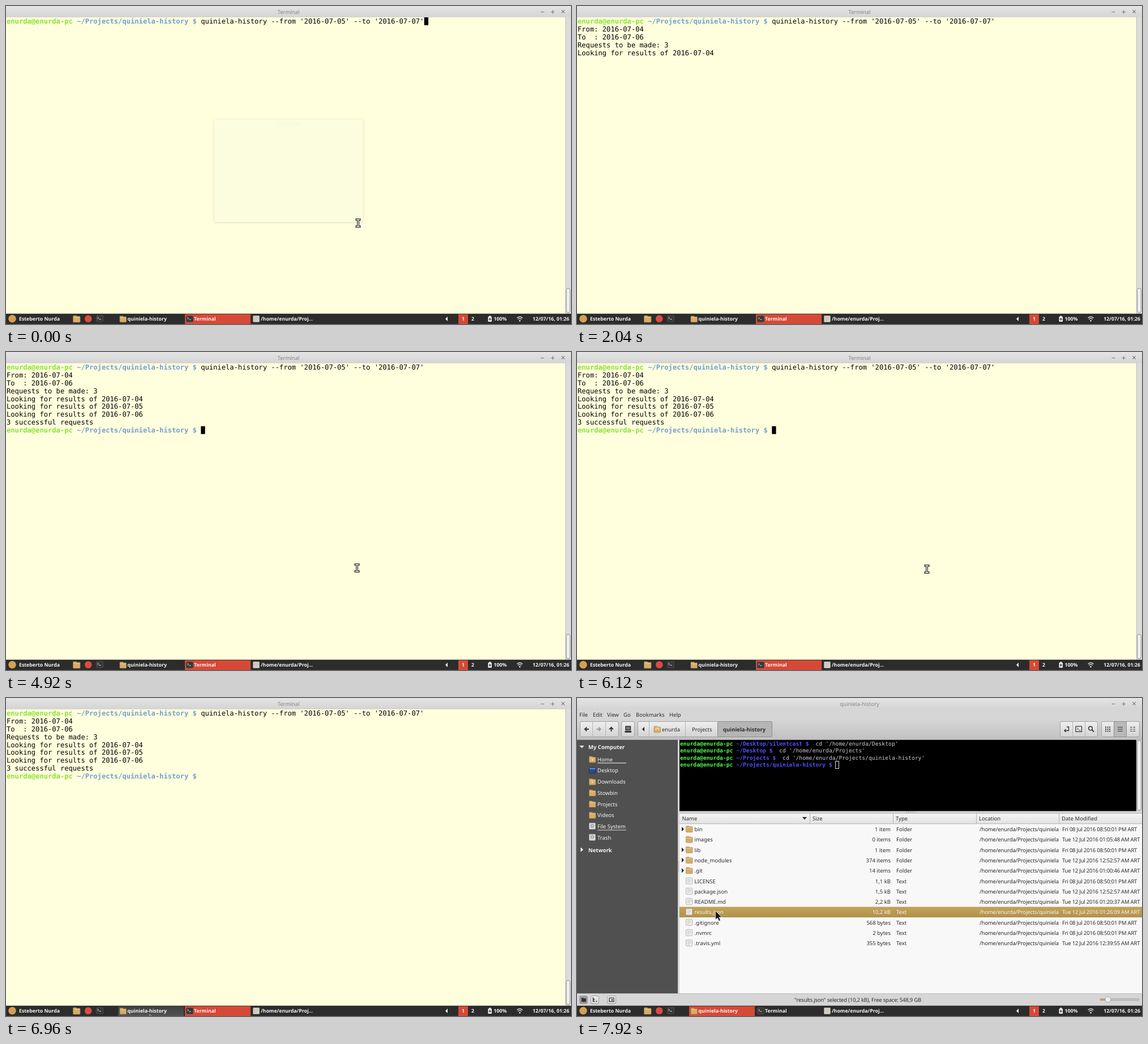
Animation, 998 px wide and 561 px high, one loop 8000 ms. Source, as an HTML page:

```html
<!DOCTYPE html>
<html lang="en">
<head>
<meta charset="utf-8">
<title>Terminal session</title>
<style>
html, body { margin: 0; width: 100%; height: 100%; overflow: hidden; }
svg { display: block; width: 998px; height: 561px; }
text { white-space: pre; text-rendering: geometricPrecision; font: 9.5px "Noto Sans", "Open Sans", sans-serif; fill: #2d2d2d; }
.title { fill: #858585; text-anchor: middle; }
.bold { font-weight: 700; }
.light { fill: #f4f4f4; }
.end { text-anchor: end; }
.mid { text-anchor: middle; }
.snug { letter-spacing: -.11px; }
.tight { letter-spacing: -.22px; }
.task { font-size: 8.77px; font-weight: 700; fill: #f5f5f5; }
.term { font: 12.13px "DejaVu Sans Mono", monospace; fill: #000; }
.pane { font: 9.71px "DejaVu Sans Mono", monospace; fill: #ccc; }
.prompt { font-weight: 700; }
</style>
</head>
<body>
<svg id="stage" viewBox="0 0 998 561" xmlns="http://www.w3.org/2000/svg"></svg>
<script>
const USER = 'enurda', HOST = USER + '@' + USER + '-pc', PROJECT = 'quiniela-history';
const LOOP = 8000, TICK = 120, COL = 7.304, ROW = 13.87;

const rect = (x, y, w, h, fill, more = '') => `<rect x="${x}" y="${y}" width="${w}" height="${h}" fill="${fill}" ${more}/>`;
const path = (d, fill = 'none', more = '') => `<path d="${d}" fill="${fill}" ${more}/>`;
const line = (d, color = '#333', width = 1, dash = 'none') =>
  path(d, 'none', `stroke="${color}" stroke-width="${width}" stroke-dasharray="${dash}"`);
const text = (x, y, s, cls = '') => `<text x="${x}" y="${y}" class="${cls}">${s}</text>`;
const circle = (x, y, r, fill, more = '') => `<circle cx="${x}" cy="${y}" r="${r}" fill="${fill}" ${more}/>`;
const group = (id, body) => `<g id="${id}">${body}</g>`;
const gradient = (id, a, b) => `<linearGradient id="${id}" x2="0" y2="1"><stop stop-color="${a}"/><stop offset="1" stop-color="${b}"/></linearGradient>`;

const folder = (x, y, s = 12) =>
  path(`M${x} ${y + s * .9}V${y + 1.5}q0-1 1-1h${s * .38}l1.2 1.2h${s * .62 - 3.2}q1 0 1 1V${y + s * .9}q0 1-1 1H${x + 1}q-1 0-1-1z`, '#d5ad68', 'stroke="#a98145" stroke-width=".7"') +
  line(`M${x + 1} ${y + 3.6}h${s - 2}`, '#ecd09a', .9);
const sheet = (x, y, fill = '#f1f1ef') => rect(x, y, 11, 11, fill, 'rx="1" stroke="#a2a2a2" stroke-width=".8"') +
  line(`M${x + 2} ${y + 3}h7m-7 2.3h7m-7 2.3h5`, '#b4b4b4', .8);
const shell = (x, y) => rect(x, y, 12, 11, '#383838', 'rx="1.5" stroke="#555" stroke-width=".8"') +
  line(`M${x + 2} ${y + 2.5}l2 1.8-2 1.8M${x + 5} ${y + 6.6}h3`, '#eee');
const button = (x, y, w, h, fill = 'url(#btn)') => rect(x + .5, y + .5, w, h, fill, 'rx="2.5" stroke="#a0a0a0"');
const scrollThumb = (y, h) => rect(989.7, y, 6.6, h, '#efefef', 'rx="3.3" stroke="#8e8e8e"');
const prompt = (dir, a, b) => `<tspan class="prompt" fill="${a}">${HOST}</tspan> <tspan class="prompt" fill="${b}">${dir} $</tspan> `;

const titleBar = title => rect(0, 0, 998, 20, 'url(#bar)') + text(499, 14.4, title, 'title') +
  line('M944.5 10.5h6M962.5 10.5h6.5M965.7 7.2v6.5M981.3 7.2l5.4 5.4m0-5.4l-5.4 5.4', '#777', 1.1);

const shellPrompt = prompt('~/Projects/' + PROJECT, '#8ae234', '#729fcf');
const output = [
  [0, shellPrompt + PROJECT + " --from '2016-07-05' --to '2016-07-07'"],
  [1920, 'From: 2016-07-04'],
  [1920, 'To  : 2016-07-06'],
  [1920, 'Requests to be made: 3'],
  [1920, 'Looking for results of 2016-07-04'],
  [2760, 'Looking for results of 2016-07-05'],
  [3240, 'Looking for results of 2016-07-06'],
  [4200, '3 successful requests'],
  [4200, shellPrompt]
];

function terminalWindow() {
  return rect(0, 0, 998, 543, '#ffffdd') + titleBar('Terminal') +
    rect(988, 19, 10, 524, '#dcdcdc') + line('M988.5 19V543', '#bdbdb8') + scrollThumb(498, 43) +
    output.map(([, s], i) => `<g class="out">${text(1, 31.1 + i * ROW, s, 'term')}</g>`).join('') +
    group('ghost', rect(368, 200, 263, 181, '#fcfcde', 'style="filter:drop-shadow(0 1px 2px #0002)"') +
      `<g opacity=".05">${text(499, 211, 'Terminal', 'title')}</g>`) +
    group('block', rect(0, 0, 7.3, 13.8, '#000'));
}

function toolbar() {
  const menu = [[4, 'File'], [28, 'Edit'], [53, 'View'], [82, 'Go'], [104, 'Bookmarks'], [163, 'Help']];
  const bars = x => `M${x} 51.5h9m-9 3.5h9m-9 3.5h9`;
  return rect(0, 38, 998, 36, 'url(#tools)') + menu.map(([x, s]) => text(x, 33, s)).join('') +
    button(5, 41, 68, 27) + button(78, 41, 23, 27) + button(107, 41, 237, 27) +
    button(853, 41, 66, 27) + button(926, 41, 67, 27) +
    rect(248.5, 41.5, 96, 27, '#b5b5b5', 'rx="2" stroke="#8d8d8d"') + rect(948.5, 41.5, 22, 27, '#b9b9b9', 'stroke="#8d8d8d"') +
    line('M27.5 42v26M50.5 42v26M127.5 42v26M191.5 42v26M875.5 42v26M897.5 42v26', '#b5b5b5') +
    line('M21 55h-7m3.3-3.4L13.8 55l3.5 3.4M60.5 59v-7m-3.4 3.3l3.4-3.5 3.4 3.5', '#333', 1.9) +
    line('M34.5 55h7m-3.3-3.4l3.5 3.4-3.5 3.4', '#999', 1.9) +
    rect(86, 50, 8.5, 6.5, '#777', 'stroke="#222" stroke-width="1.3"') + rect(84.5, 58, 11.5, 3, '#333') +
    path('M119 51v8l-4-4z', '#222') +
    folder(136, 49.5, 11.5) + line('M139.5 57v-2.5l2.3-1.8 2.3 1.8V57', '#fff') +
    text(150, 59, USER) + text(203, 59, 'Projects') + text(258, 59, PROJECT, 'bold') +
    line('M865 51h3.5v6.5H861m2.5-2.5L861 57.5l2.5 2.5', '#333', 1.4) +
    rect(881, 50, 10.5, 9.5, 'none', 'stroke="#333" stroke-width="1.2"') + line('M883.5 52.5l2 2-2 2m3 .5h3') +
    circle(907, 53.5, 3.3, 'none', 'stroke="#333" stroke-width="1.5"') + line('M909.5 56l3.5 3.5', '#333', 2) +
    line(bars(933), '#333', 1.8, '2 1.5') + line(bars(955), '#333', 1.2) + line(bars(977), '#333', 1.2, '3.7 1.6');
}

function sidebar() {
  const places = ['Home', 'Desktop', 'Downloads', 'Stowbin', 'Projects', 'Videos', 'File System', 'Trash'];
  const icon = (i, y) =>
    i === 1 ? rect(21.5, y - 5, 11.5, 9.5, '#2a4f8e', 'rx="1" stroke="#14284f"') + rect(22, y - 4.5, 10.5, 2, '#6c94cf') :
    i > 5 ? sheet(21.5, y - 6, '#dcdcdc') + circle(27, y - 1, 2.5, 'none', 'stroke="#888"') :
    folder(21.5, y - 5.8, 11.5) + (i === 0 || i === 2 ? circle(27.2, y + .8, 1.6, '#f3dfb4') : '');
  return rect(0, 74, 178, 447, '#505050') + path('M4.5 84h8l-4 4.5z', '#fff') + text(20, 90, 'My Computer', 'bold light') +
    places.map((s, i) => icon(i, 108.3 + i * 19.7) + text(36, 111.7 + i * 19.7, s, 'light')).join('') +
    line('M36 114.7h51M36 233h51', '#d8d8d8', 1.2) +
    path('M6.5 263.5v8l4.5-4z', '#fff') + text(20, 271.6, 'Network', 'bold light');
}

function fileList() {
  const early = 'Fri 08 Jul 2016 08:50:01 PM ART', late = s => `Tue 12 Jul 2016 ${s} AM ART`;
  const files = [
    ['bin', '1 item', early], ['images', '0 items', late('01:05:48')], ['lib', '1 item', early],
    ['node_modules', '374 items', late('12:52:57')], ['.git', '14 items', late('01:00:46')],
    ['LICENSE', '1,1 kB', early], ['package.json', '1,5 kB', late('12:52:57')],
    ['README.md', '2,2 kB', late('01:20:37')], ['results.json', '10,2 kB', late('01:26:09')],
    ['.gitignore', '568 bytes', early], ['.nvmrc', '2 bytes', early], ['.travis.yml', '355 bytes', late('12:39:55')]
  ];
  const heads = [[185.5, 'Name'], [416, 'Size'], [563, 'Type'], [710, 'Location'], [856, 'Date Modified']];
  const row = ([name, size, date], i) => {
    const y = 231.7 + i * 18.27, base = y + 3.5, tone = i === 8 ? 'light' : '';
    return (i === 8 ? rect(181, 368.4, 817, 18.6, 'url(#gold)') : '') +
      (i < 5 && i !== 1 ? path(`M185 ${y - 4.5}v8l4-4z`, '#222') : '') +
      (i < 5 ? folder(192.5, y - 6.3, 11.5) : sheet(192.5, y - 6)) +
      text(207.5, base, name, tone) + text(554, base, size, tone + ' end') +
      text(564, base, i < 5 ? 'Folder' : 'Text', tone) +
      `<g clip-path="url(#place)">${text(711, base, `/home/${USER}/Projects/quiniela`, tone + ' snug')}</g>` +
      text(857, base, date, tone + ' tight');
  };
  return rect(181, 203, 817, 318, '#f8f8f8') + rect(181, 203, 817, 19, 'url(#head)') +
    line('M181 203.5h817M181 221.8h817M411.5 203v19M558.5 203v19M705.5 203v19M851.5 203v19', '#b4b4b4') +
    path('M398 210h8l-4 4.5z', '#222') +
    heads.map(([x, s]) => text(x, 215.8, s)).join('') + files.map(row).join('');
}

function shellPane() {
  const entries = [
    ['~/Desktop/silentcast', ` cd '/home/${USER}/Desktop'`], ['~/Desktop', ` cd '/home/${USER}/Projects'`],
    ['~/Projects', ` cd '/home/${USER}/Projects/${PROJECT}'`], ['~/Projects/' + PROJECT, '']
  ];
  return rect(181, 74, 807, 125.5, '#000') +
    entries.map(([dir, cmd], i) => text(182, 84 + i * 12.35, prompt(dir, '#4dff4d', '#4f4fff') + cmd, 'pane')).join('') +
    rect(456.5, 111.5, 6, 13, 'none', 'stroke="#ddd"') +
    rect(988, 74, 10, 125.5, '#d2d2d2') + scrollThumb(75, 123) +
    line('M581 201.5h18M179.5 289v18', '#999', 1.3, '1.5 2');
}

function statusBar() {
  return line('M0 521.5h998', '#bbb') + button(4, 525, 14, 14, '#999') + button(24, 525, 14, 14) + button(53, 525, 15, 14) +
    path('M8 529h3l1 1h4v6H8z', '#333') + line('M28.5 528v7h3m2 0h2m-7-3.5h3', '#333', 1.4) +
    rect(57, 529, 8, 6.5, 'none', 'stroke="#333" stroke-width="1.2"') + path('M63 530.5v4l-3-2z', '#333') +
    text(496, 535.9, '"results.json" selected (10,2 kB), Free space: 548,9 GB', 'mid tight') +
    rect(924, 530.5, 69, 3, '#c4c4c4', 'rx="1.5" stroke="#9c9c9c" stroke-width=".7"') +
    rect(924, 530.5, 13, 3, '#bfa05a', 'rx="1.5"') + circle(938, 532, 5, '#f0f0f0', 'stroke="#999" stroke-width=".9"');
}

const fileWindow = () => rect(0, 0, 998, 543, '#d6d6d6') + titleBar(PROJECT) + toolbar() +
  line('M0 73.5h998', '#aaa') + sidebar() + shellPane() + fileList() + statusBar();

function taskBar() {
  return rect(0, 542.8, 998, 18.2, '#2c2c2c') +
    circle(11, 551.8, 6.8, '#d5a052') + text(23, 555.2, 'Esteberto Nurda', 'task') +
    folder(118.5, 545.8, 12.5) + circle(145.3, 551.8, 6.3, '#dc4c3f') + shell(159.5, 546) +
    rect(198, 543.7, 116, 17.3, 'url(#hover)', 'id="hover"') +
    rect(0, 543.7, 116, 17.3, '#d64937', 'id="active"') +
    folder(201, 546.5, 11.5) + text(214.5, 555.2, PROJECT, 'task') +
    shell(318.5, 546.5) + text(332, 555.2, 'Terminal', 'task') +
    sheet(436.5, 546.5, '#d8d2c6') + text(450, 555.2, `/home/${USER}/Proj...`, 'task') +
    path('M780 548v8l-4-4z', '#eee') + rect(799, 543.7, 17, 17.3, '#d64937') +
    text(807.5, 555.2, '1', 'task mid') + text(824.5, 555.2, '2', 'task mid') +
    rect(851.5, 548, 6.5, 9, '#eee', 'rx=".8"') + rect(853.3, 546.5, 3, 2, '#eee') +
    line('M854.8 550v5m-2-2.5h4', '#2c2c2c', 1.2) + text(861.5, 555.2, '100%', 'task') +
    line('M902.5 550.5q5-4.5 10 0M904.3 552.7q3.2-2.8 6.4 0', '#ddd', 1.3) + circle(907.5, 555.3, 1.4, '#ddd') +
    text(995, 555.2, '12/07/16, 01:26', 'task end');
}

const stage = document.getElementById('stage');
stage.innerHTML = `<defs>${gradient('bar', '#e4e4e4', '#d4d4d4')}${gradient('tools', '#d6d6d6', '#c0c0c0')}` +
  `${gradient('btn', '#efefef', '#d3d3d3')}${gradient('head', '#f5f5f5', '#e2e2e2')}` +
  `${gradient('gold', '#c3a35a', '#b2914a')}${gradient('hover', '#404040', '#535353')}` +
  `<clipPath id="place">${rect(706, 203, 145.5, 318, '#000')}</clipPath></defs>` +
  group('terminal', terminalWindow()) + group('files', fileWindow()) + taskBar() +
  group('beam', path('M-4-7.5h8v2.6h-2.6v9.8h2.6v2.6h-8v-2.6h2.6v-9.8h-2.6z', '#e8e8e0', 'stroke="#222" stroke-width="1.1"')) +
  group('arrow', path('M0 0V15.5L3.6 12.4 6 18 8.7 16.8 6.3 11.3H11z', '#111', 'stroke="#ddd" stroke-width=".9"'));

const el = id => document.getElementById(id);
const show = (node, on) => node.setAttribute('display', on ? 'inline' : 'none');
const move = (node, x, y) => node.setAttribute('transform', `translate(${x} ${y})`);
const latest = (list, t) => list.filter(([start]) => start <= t).pop();
const outs = [...document.querySelectorAll('.out')];

// Each step holds until the next: time, then its value.
const blinkStarts = [[-TICK], [1440], [4920]];
const caretCells = [[0, 101, 0], [1560, 0, 1], [1920, 0, 5], [2760, 0, 6], [3240, 0, 7], [4200, 47, 8]];
const pointer = [
  [0, 622, 383, 'beam'], [1440, 0, 0, ''], [4920, 620, 381, 'beam'], [5040, 618, 383, 'beam'],
  [6240, 535, 434, 'beam'], [6360, 349, 519, 'beam'], [6480, 254, 558, 'arrow'], [7200, 252, 530, 'arrow'],
  [7320, 243, 466, 'arrow'], [7440, 238, 417, 'arrow'], [7560, 240, 398, 'arrow'],
  [7680, 243, 386, 'arrow'], [7800, 244, 378, 'arrow'], [7920, 244.7, 375.5, 'arrow']
];

function render(t) {
  const filesOpen = t >= 7080;
  show(el('terminal'), !filesOpen);
  show(el('files'), filesOpen);
  show(el('hover'), t >= 6480 && !filesOpen);
  el('active').setAttribute('x', filesOpen ? 198 : 316);
  show(el('ghost'), t < TICK);
  outs.forEach((node, i) => show(node, t >= output[i][0]));

  const [, col, row] = latest(caretCells, t);
  move(el('block'), 1 + col * COL, 20 + row * ROW);
  show(el('block'), Math.floor((t - latest(blinkStarts, t)[0]) / 600) % 2 === 0);

  const [, x, y, shape] = latest(pointer, t);
  for (const id of ['beam', 'arrow']) {
    show(el(id), id === shape);
    move(el(id), x, y);
  }
}

const began = performance.now();
function frame() {
  render((performance.now() - began) % LOOP);
  requestAnimationFrame(frame);
}
frame();
</script>
</body>
</html>
```
